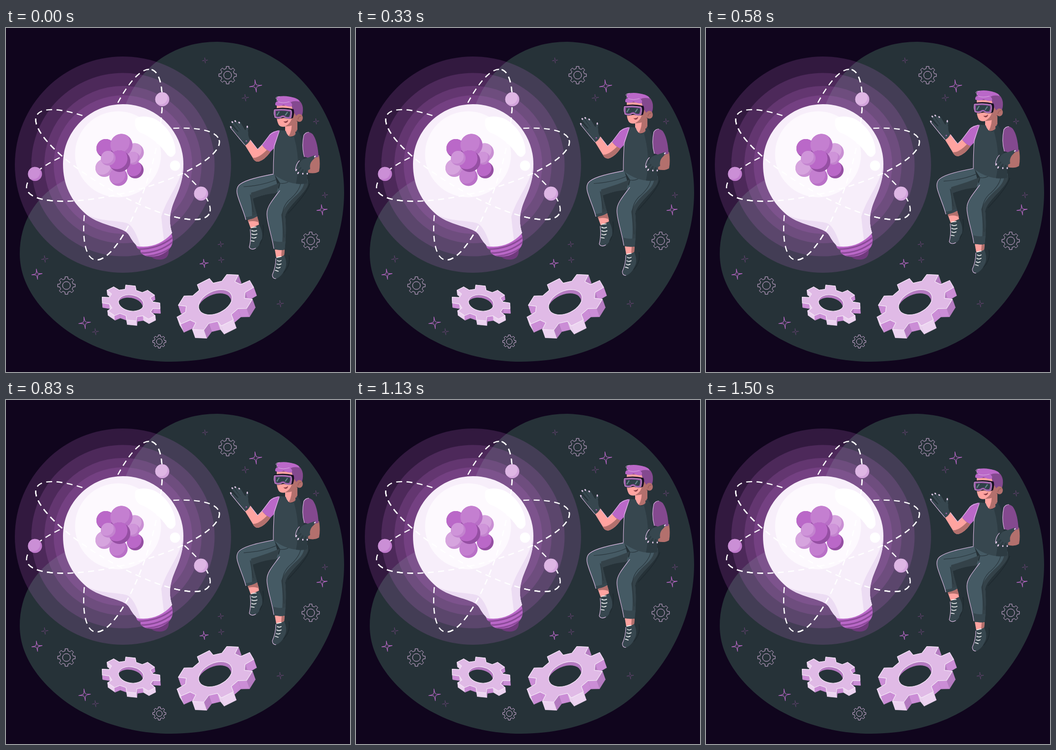
Recreate the animation shown at these times as an HTML page. Size 700 px wide and 700 px high, loop 1.54 s.

```html
<!DOCTYPE html>
<html lang="en">
<head>
<meta charset="utf-8">
<title>Floating with an idea</title>
<style>
html, body { margin: 0; height: 100%; overflow: hidden; background: #10051d; }
svg { display: block; width: 100vw; height: 100vh; }
.edge { fill: none; stroke: #e1bee7; stroke-width: 1.1; stroke-linecap: round; stroke-linejoin: round; }
.dark { fill: none; stroke: #2a373e; stroke-width: 1.2; stroke-linecap: round; }
.shadow { fill: none; stroke: #1f2a30; stroke-width: 1.6; stroke-linecap: round; }
.lace { fill: none; stroke: #fff; stroke-width: 1.5; stroke-linecap: round; }
.finger { fill: none; stroke: #37474f; stroke-width: 4.6; stroke-linecap: round; }
.thin { stroke-width: 3.4; }
.tip { fill: none; stroke: #e6cdeb; stroke-width: 2.6; stroke-linecap: round; }
.orbit { fill: none; stroke: #fff; stroke-width: 2.4; stroke-dasharray: 12 9; }
</style>
</head>
<body>
<svg viewBox="0 0 700 700">
  <defs>
    <clipPath id="screwClip"><path d="M264 441Q305 441 335 413Q341 428 338 440Q333 455 311 463Q288 469 277 460Q272 456 274 452Q268 450 266 446Z"/></clipPath>
    <clipPath id="bulbClip"><path d="M238 155C306 155 361 210 361 277C361 320 345 340 337 368C332 386 333 402 338 417Q309 450 267 444Q257 434 252 424Q246 413 232 409C208 400 184 396 163 379C132 352 116 318 116 277C116 210 170 155 238 155Z"/></clipPath>
  </defs>

  <path fill="#263238" d="M430 28C520 30 593 82 637 152C672 210 688 275 688 335C688 433 643 534 564 603C504 655 422 679 335 679C250 679 165 650 110 605C55 560 28 510 28 460C28 395 60 345 110 315C175 280 222 230 240 165C265 90 330 28 430 28Z"/>
  <g id="glow" fill="#ba68c8" fill-opacity=".2"></g>
  <g id="decor"></g>
  <g id="orbitsBack"></g>

  <!-- bulb -->
  <path fill="#6f3a7c" d="M292 462Q300 473 317 471Q333 468 331 450Z"/>
  <g clip-path="url(#screwClip)">
    <rect x="255" y="405" width="90" height="70" fill="#ba68c8"/>
    <path fill="none" stroke="#8c4a99" stroke-width="3.2" d="M266 450Q310 451 342 424M270 458Q312 459 342 433M276 465Q314 465 342 443"/>
  </g>
  <g clip-path="url(#bulbClip)">
    <rect x="110" y="150" width="255" height="300" fill="#f7eefa"/>
    <path fill="#ecdcf3" d="M163 379C190 394 225 391 246 397Q262 404 274 446L250 440L230 412L160 392Z"/>
    <path fill="#ecdcf3" d="M361 277C355 318 327 345 316 384Q318 405 322 436L345 420L340 375L366 320Z"/>
    <circle cx="228" cy="257" r="87.5" fill="#fdf9fe"/>
    <path fill="#fff" d="M264 184Q277 176 301 184C330 198 346 230 345 254Q338 268 328 258C316 240 296 221 273 213Q258 202 264 184Z"/>
    <circle cx="344" cy="280" r="10.5" fill="#fff"/>
  </g>
  <g id="nucleus"></g>
  <g id="orbitsFront"></g>
  <g id="electrons"></g>
  <g id="gears"></g>

  <g id="man">
    <path class="shadow" d="M618 317Q612 337 574 377M523 401Q526 424 516 440M576 463Q579 484 565 498"/>

    <!-- head -->
    <path fill="#b3706d" d="M568 190H593V211Q588 222 575 221L568 213Z"/>
    <path fill="#ffa3a0" d="M568 196L581 191Q583 207 575 221L568 213Z"/>
    <path fill="#84498f" d="M556 146Q573 138 588 142Q602 148 604 162Q605 173 601 181L591 187L583 167L558 160Z"/>
    <path fill="#ffa3a0" d="M551 158H581L588 182Q586 196 571 200Q559 203 555 197Q551 190 551 180Z"/>
    <path fill="#b3706d" d="M583 168L593 182Q593 195 583 198Q573 201 568 200Q583 192 582 176Z"/>
    <ellipse cx="597" cy="183" rx="7" ry="8" fill="#b3706d"/>
    <path fill="none" stroke="#8f514f" d="M594 186Q596 178 601 180"/>
    <path fill="#ba68c8" d="M548 157Q547 150 553 149Q547 141 556 139Q572 137 586 142Q597 145 597 150Q587 147 579 151Q585 156 580 160Q571 160 565 156Q557 161 548 157Z"/>
    <path fill="none" stroke="#e1bee7" stroke-width=".8" d="M551 149Q553 145 549 143Q550 139 557 140M554 150Q563 154 577 150"/>
    <path fill="#170e21" d="M545 164Q565 160 585 165Q588 171 584 183Q575 187 566 183L559 184Q549 187 545 180Z"/>
    <path fill="#9c5ba9" stroke="#e1bee7" stroke-width=".8" d="M546 166Q564 164 580 167Q583 171 580 183Q572 186 567 182Q563 179 559 183Q552 185 547 182Q544 173 546 166Z"/>
    <path fill="#2f4048" d="M549 169Q564 167 578 170Q579 176 576 181Q570 182 566 178Q562 177 558 180Q552 182 549 179Z"/>
    <path stroke="#648087" stroke-width="2.4" d="M556 170L551 178M573 171L568 178"/>
    <path fill="#8a3e45" d="M564 190Q570 191 574 187Q574 193 568 193Z"/>

    <!-- legs -->
    <path fill="#ffa3a0" d="M492 391L511 383L515 400L498 408Z"/>
    <path fill="#b3706d" d="M492 391L511 383L515 396Q505 391 494 394Z"/>
    <path fill="#ffa3a0" d="M547 451L567 449L566 463L550 468Z"/>
    <path fill="#b3706d" d="M561 450L567 449L566 463L560 465Z"/>
    <path fill="#455a64" d="M546 296C520 302 489 308 476 318Q467 325 471 340C477 360 484 374 488 390Q500 390 511 383C508 370 504 359 502 347Q525 338 556 333Z"/>
    <path fill="#344249" d="M499 335Q530 326 557 315L550 336Q525 338 502 347L511 383L501 387Q500 357 498 342Z"/>
    <path fill="#37474f" d="M487 385Q500 384 510 378L511 383Q501 390 488 390Z"/>
    <path class="dark" d="M484 323Q520 321 549 309M497 339L503 374"/>
    <path fill="#455a64" d="M545 296L613 306Q617 317 609 329C596 347 571 366 568 384Q571 410 567 451Q556 453 546 450C542 421 530 394 531 376C535 355 555 339 558 316Z"/>
    <path fill="#344249" d="M613 309Q618 319 609 329C596 347 571 366 568 384Q571 410 567 451L561 452Q565 410 560 380Q567 361 591 340Q607 326 607 311Z"/>
    <path fill="#37474f" d="M544 433Q556 437 569 434L567 451Q556 453 546 450Z"/>
    <path class="dark" d="M558 316Q572 318 580 308M600 313Q599 331 575 351Q560 367 563 389L566 426"/>
    <path class="edge" d="M545 297C520 302 489 308 476 318Q467 325 471 340C477 360 484 374 488 390M557 331C546 346 531 362 531 377C530 394 541 421 545 449"/>

    <!-- shoes -->
    <path fill="#37474f" d="M498 408Q508 407 515 400Q524 417 521 429Q517 434 515 442Q507 454 496 449Q494 445 498 433Z"/>
    <path fill="#37474f" d="M550 467Q559 468 566 462Q574 480 567 492Q560 508 547 511Q541 508 543 500Q549 486 550 467Z"/>
    <path class="edge" d="M497 410Q499 432 495 446Q499 453 508 448M549 469Q549 487 542 502Q542 510 549 510"/>
    <path class="lace" d="M500 406L509 405M500 412Q505 415 510 412M500 419Q505 422 511 419M500 426Q504 429 509 426M499 433L505 434M551 467L560 465M552 473Q556 476 560 473M551 480Q555 483 560 480M550 487Q553 490 558 487M548 493L554 495"/>

    <!-- body -->
    <path fill="#26323a" d="M589 211Q601 208 609 216L612 297L590 290Z"/>
    <path fill="#ba68c8" d="M557 208Q544 209 537 216L521 238Q528 248 538 252L546 244L551 228Z"/>
    <path fill="#37474f" d="M557 208L569 209Q573 222 582 222Q590 219 592 207Q604 220 603 246Q604 271 613 289L613 316Q576 322 544 297Q546 262 545 246Z"/>
    <path fill="#26323a" opacity=".55" d="M586 221Q592 217 592 207Q604 220 603 246Q604 271 613 289L613 316Q602 319 590 317Q600 270 586 221Z"/>
    <path class="edge" d="M554 209Q543 212 537 217L521 238M556 210L546 239Q544 267 544 296"/>

    <!-- raised arm -->
    <path fill="#ffa3a0" d="M521 238Q528 248 538 252Q527 268 514 272Q506 273 502 264L486 238L497 227L512 247Z"/>
    <path fill="#b3706d" d="M531 248L538 252Q527 268 514 272Q506 273 502 264Q513 266 531 248Z"/>
    <path class="edge" d="M521 238L512 247L498 229"/>
    <path class="finger" d="M475 218L458 202M478 213L461 192M481 209L467 190M484 208L475 193M489 216L491 202"/>
    <path fill="#37474f" d="M470 215Q475 205 485 206L493 211Q492 221 497 228Q492 237 486 239Q480 231 474 226Z"/>
    <path class="tip" d="M458 202L457 201M461 192L460 191M467 190L466 189M475 193L474 192M491 202L491 200"/>
    <path class="edge" d="M457 203L475 225L486 238"/>
    <circle cx="489" cy="230" r="1.5" fill="#9a61a7"/>

    <!-- lowered arm -->
    <path fill="#b3706d" d="M615 259L637 259Q640 277 637 292Q628 298 613 294L609 280Z"/>
    <path fill="#84498f" d="M606 218Q613 207 624 216Q634 229 636 262Q622 267 607 262Q601 241 606 218Z"/>
    <path class="edge" d="M607 262Q601 241 606 218Q610 212 616 212"/>
    <path class="finger thin" d="M601 279L591 289M605 283L595 295M609 286L604 296M613 286L613 296M615 270L628 262"/>
    <path fill="#37474f" d="M597 278Q600 266 614 264L628 259Q632 262 623 270Q617 277 619 287Q611 293 602 286Z"/>
    <path class="tip" d="M591 288L590 290M595 294L594 296M604 296L604 297M613 296L613 297M628 262L629 261"/>
    <path class="edge" d="M589 288Q590 277 597 270"/>
  </g>
</svg>

<script>
const NS = "http://www.w3.org/2000/svg";
const $ = id => document.getElementById(id);
const add = (parent, tag, attrs) => {
  const el = document.createElementNS(NS, tag);
  for (const k in attrs) el.setAttribute(k, attrs[k]);
  return parent.appendChild(el);
};
const rad = deg => deg * Math.PI / 180;
const toPath = pts => "M" + pts.map(p => p.map(v => v.toFixed(1))).join("L") + "Z";

for (const r of [220, 186.5, 160, 141]) add($("glow"), "circle", { cx: 238, cy: 278, r });

// orbits: the near half is repeated in front of the bulb
for (const turn of [29.8, -14.3, -73.2]) {
  const transform = `translate(238 278) rotate(${turn})`;
  const near = "M202 0A202 57 0 0 1 -202 0";
  add($("orbitsBack"), "path", { class: "orbit", transform, d: near + "A202 57 0 0 1 202 0" });
  add($("orbitsFront"), "path", { class: "orbit", transform, d: near });
}

// ball with a shaded crescent at the lower right
function ball(parent, x, y, r, color, shade) {
  const d = r * 0.13, h = Math.sqrt((r * r - 2 * d * d) / 2), arc = `A${r} ${r} 0 0 0 `;
  const top = `${x - d + h} ${y - d - h}`, low = `${x - d - h} ${y - d + h}`;
  add(parent, "circle", { cx: x, cy: y, r, fill: shade });
  add(parent, "path", { fill: color, d: `M${top}${arc}${low}${arc}${top}Z` });
}
const tones = [["#ba68c8", "#954fa3"], ["#c47fd0", "#b970c7"], ["#d6a4de", "#c98fd3"], ["#cf94d9", "#c383cf"]];
[[203, 245, 19, 0], [262, 253, 18.5, 2], [263, 289, 17, 0], [200, 285, 18, 2], [229, 303, 18.5, 1],
 [235, 238, 22.5, 1], [259, 265, 13, 3], [231, 271, 22, 0], [208, 265, 15, 3]]
  .forEach(([x, y, r, t]) => ball($("nucleus"), x, y, r, ...tones[t]));
[[318, 145, "#deb6e4", "#d3a3dc"], [59, 297, "#cb8fd6", "#c07bcd"], [397, 337, "#deb6e4", "#d3a3dc"]]
  .forEach(([x, y, c, s]) => ball($("electrons"), x, y, 14.3, c, s));

// unit gear, mapped through an ellipse
function gearPoints(cx, cy, a, b, tilt, phase, root, tipHalf, rootHalf) {
  const pts = [], c = Math.cos(rad(tilt)), s = Math.sin(rad(tilt));
  for (let i = 0; i < 8; i++)
    for (const [off, r] of [[-rootHalf, root], [-tipHalf, 1], [tipHalf, 1], [rootHalf, root]]) {
      const t = rad(i * 45 + phase + off), x = a * r * Math.cos(t), y = b * r * Math.sin(t);
      pts.push([cx + x * c - y * s, cy + x * s + y * c]);
    }
  return pts;
}

function solidGear(id, cx, cy, a, b, tilt, phase, dx, dy) {
  const g = $("gears"), pts = gearPoints(cx, cy, a, b, tilt, phase, 0.77, 9.5, 14);
  pts.map((p, i) => [p, pts[(i + 1) % pts.length], i % 4 === 1])
    .sort((m, n) => m[0][1] + m[1][1] - n[0][1] - n[1][1])
    .forEach(([p, q, isTip]) => {
      const nx = (q[1] - p[1]) / Math.hypot(q[0] - p[0], q[1] - p[1]);
      const fill = nx < (isTip ? 0.5 : -0.45) ? "#ecd3f0" : nx > 0.75 ? "#b47bc0" : "#cb8dd6";
      const d = toPath([p, q, [q[0] + dx, q[1] + dy], [p[0] + dx, p[1] + dy]]);
      add(g, "path", { d, fill, stroke: fill, "stroke-width": 0.6 });
    });
  const rim = { stroke: "#f6e9f8", "stroke-width": 1.2, "stroke-linejoin": "round" };
  add(g, "path", { ...rim, d: toPath(pts), fill: "#e0bae6" });
  const hole = { cx, cy, rx: a * 0.43, ry: b * 0.46, transform: `rotate(${tilt} ${cx} ${cy})` };
  add(add(g, "clipPath", { id }), "ellipse", hole);
  add(g, "ellipse", { ...hole, fill: "#b57ac1" });
  const inner = add(g, "g", { "clip-path": `url(#${id})` });
  add(add(inner, "g", { transform: `translate(-2 ${4 + dy * 0.2})` }), "ellipse", { ...hole, fill: "#263238" });
  add(g, "ellipse", { ...hole, ...rim, fill: "none" });
}
solidGear("holeA", 254.5, 559.5, 60, 35.5, 10, -7, 1, 9.5);
solidGear("holeB", 426, 558, 84, 49, -25, -3, 6, 17);

// line gears and sparkles
[[451, 96, 18], [123, 524, 18], [620, 433, 18], [312, 638, 13.5]].forEach(([x, y, r]) => {
  const line = { fill: "none", stroke: "#d8b4df", "stroke-width": 1, "stroke-linejoin": "round" };
  add($("decor"), "path", { ...line, d: toPath(gearPoints(x, y, r, r, 0, 0, 0.77, 9, 12)) });
  add($("decor"), "circle", { ...line, cx: x, cy: y, r: r * 0.44 });
});
[[508, 118, 13, 1], [405, 66, 5.5, 0], [487, 142, 7, 0], [631, 190, 6, 0], [649, 340, 6, 0],
 [643, 370, 11, 1], [437, 440, 6, 0], [438, 472, 6, 0], [403, 479, 9, 1], [558, 561, 7, 0],
 [79, 470, 7, 0], [63, 501, 11, 1], [160, 600, 12.5, 1], [182, 618, 6.5, 0]].forEach(([x, y, r, bright]) => {
  const k = r * 0.06;
  add($("decor"), "path", {
    transform: `translate(${x} ${y}) rotate(-7)`,
    fill: "#263238", stroke: bright ? "#ba68c8" : "#6b4577", "stroke-width": bright ? 1.1 : 0.8,
    d: `M0 ${-r}C${k} ${-k} ${k} ${-k} ${r} 0C${k} ${k} ${k} ${k} 0 ${r}C${-k} ${k} ${-k} ${k} ${-r} 0C${-k} ${-k} ${-k} ${-k} 0 ${-r}Z`
  });
});

// linear float up and down, 24 steps a second
const LOOP = 1540, RISE = 15, HALF = 18.5, PEAK = 17.5;
const start = performance.now();
function tick() {
  const t = Math.max(0, performance.now() - start) % LOOP;
  const step = Math.min(36, Math.floor((t + 5) * 0.024));
  const lift = RISE * (1 - Math.abs(step - PEAK) / HALF);
  $("man").setAttribute("transform", `translate(0 ${(0.81 - lift).toFixed(2)})`);
  requestAnimationFrame(tick);
}
tick();
</script>
</body>
</html>
```
